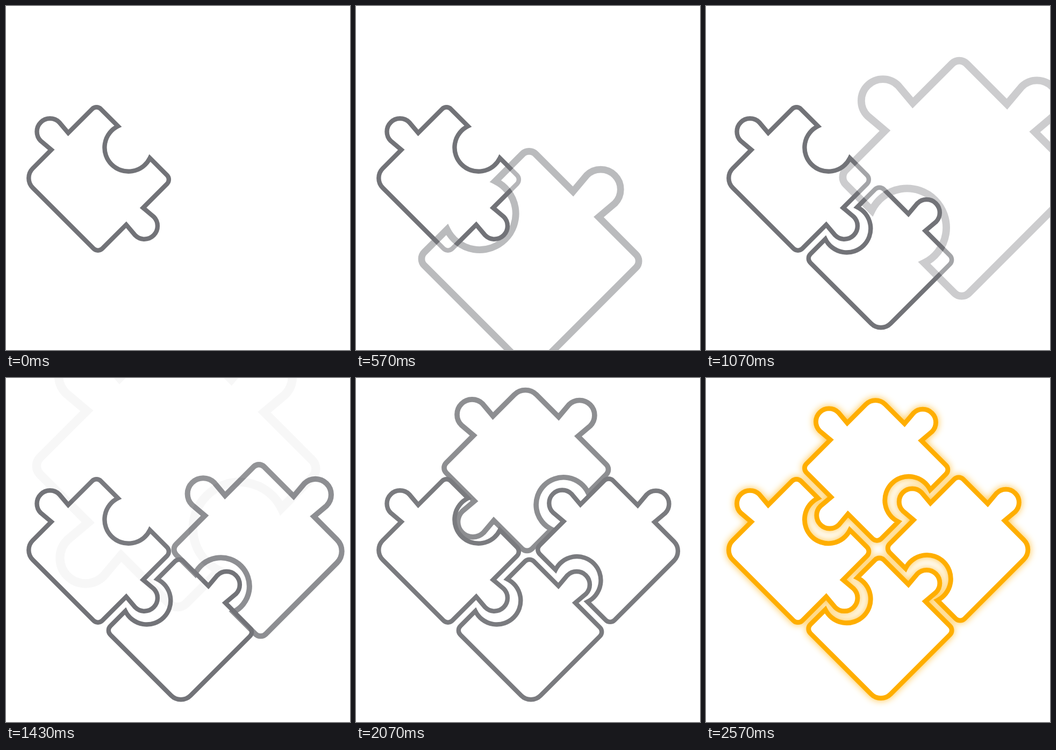
Write an HTML page that moves like this. It is 640 by 640 pixels and loops after 4210 ms.

```html
<!DOCTYPE html>
<html lang="en">
<head>
<meta charset="utf-8">
<title>Puzzle pieces</title>
<style>
  html, body { margin: 0; width: 100%; height: 100%; overflow: hidden; background: #fff; }
  svg { display: block; width: 100%; height: 100%; }
  path { fill: #fff; stroke-miterlimit: 10; }
  #plain { stroke: #727378; stroke-width: 8.4; }
  #lit { stroke: #ffae00; stroke-width: 8.8; filter: drop-shadow(0 0 7px rgba(255, 174, 0, .75)); }
</style>
</head>
<body>
<svg viewBox="0 0 640 640">
  <g id="plain"></g>
  <g id="lit" opacity="0"></g>
</svg>
<script>
const LOOP = 4210, FPS = 14, MIDDLE = 320;
const ENTER = 0.8, FIRST = 0.185, SPACING = 0.602;
const HALF_W = 98.5, HALF_H = 96.6;

// Edges clockwise from the upper right: o = tab, c = socket, - = flat.
// slide moves the socket along its edge, sink lowers the piece until it lights up.
const pieces = [
  { x: 169.7, y: 321.5, edges: 'co-o', slide: 0, sink: 0 },
  { x: 324, y: 468.2, edges: 'o--c', slide: -3.7, sink: 2.7 },
  { x: 471.5, y: 318, edges: 'o-co', slide: 3.3, sink: 2.7 },
  { x: 316.7, y: 169.1, edges: 'ocoo', slide: -1.4, sink: 0 }
];

function tab(at) {
  const r = 24.4, out = 25.7;
  return `L${at(-22.2)}L${at(-r, out)}A${r} ${r} 0 0 1 ${at(r, out)}L${at(22.2)}`;
}

function socket(at, slide) {
  return `L${at(slide - 42)}A44.4 44.4 0 1 0 ${at(slide + 42)}`;
}

// A rounded rectangle with tabs and sockets, centred on 0,0.
function outline(edges, slide, outerCorner) {
  const radius = k => k % 4 === outerCorner ? 25.5 : 11.5;
  const halfLength = k => k % 2 ? HALF_H : HALF_W;

  // point on side k: distance along from its middle, and outwards
  const side = k => (along, out = 0) => {
    const ux = Math.cos(k * Math.PI / 2), uy = Math.sin(k * Math.PI / 2);
    const far = halfLength(k + 1) + out;
    return `${(ux * along + uy * far).toFixed(2)} ${(uy * along - ux * far).toFixed(2)}`;
  };
  const begin = k => side(k % 4)(radius(k) - halfLength(k));

  let d = 'M' + begin(0);
  [...edges].forEach((kind, k) => {
    const at = side(k), r = radius(k + 1);
    if (kind === 'o') d += tab(at);
    if (kind === 'c') d += socket(at, slide);
    d += `L${at(halfLength(k) - r)}A${r} ${r} 0 0 1 ${begin(k + 1)}`;
  });
  return d + 'Z';
}

const plain = document.getElementById('plain');
const lit = document.getElementById('lit');

function addPath(parent, d) {
  const path = document.createElementNS('http://www.w3.org/2000/svg', 'path');
  path.setAttribute('d', d);
  return parent.appendChild(path);
}

// Scale about a point slightly nearer the middle of the stage than the piece's centre.
function place(path, { x, y }, scale, dy) {
  const px = x + (MIDDLE - x) * 0.02, py = y + (MIDDLE - y) * 0.02;
  path.setAttribute('transform',
    `translate(${px} ${py + dy}) scale(${scale}) translate(${x - px} ${y - py}) rotate(45)`);
}

pieces.forEach((piece, i) => {
  const d = outline(piece.edges, piece.slide, 3 - i);
  piece.start = i ? FIRST + SPACING * (i - 1) : -ENTER;
  piece.path = addPath(plain, d);
  place(addPath(lit, d), piece, 1, 0);
});

const ramp = (t, from, to) => Math.min(1, Math.max(0, (t - from) / (to - from)));

function draw(ms) {
  // whole ticks, each starting on a multiple of 10 ms
  const tick = Math.floor((Math.floor(ms / 10) * 10 + 5) * FPS / 1000);
  const t = tick / FPS;

  for (const piece of pieces) {
    const p = ramp(t, piece.start, piece.start + ENTER);
    piece.path.setAttribute('opacity', p);
    place(piece.path, piece, 2 - p, piece.sink);
  }
  plain.setAttribute('opacity', 1 - ramp(t, 2.05, 2.41));
  lit.setAttribute('opacity', ramp(t, 2.17, 2.57));
}

function frame() {
  draw(performance.now() % LOOP);
  requestAnimationFrame(frame);
}
frame();
</script>
</body>
</html>
```
